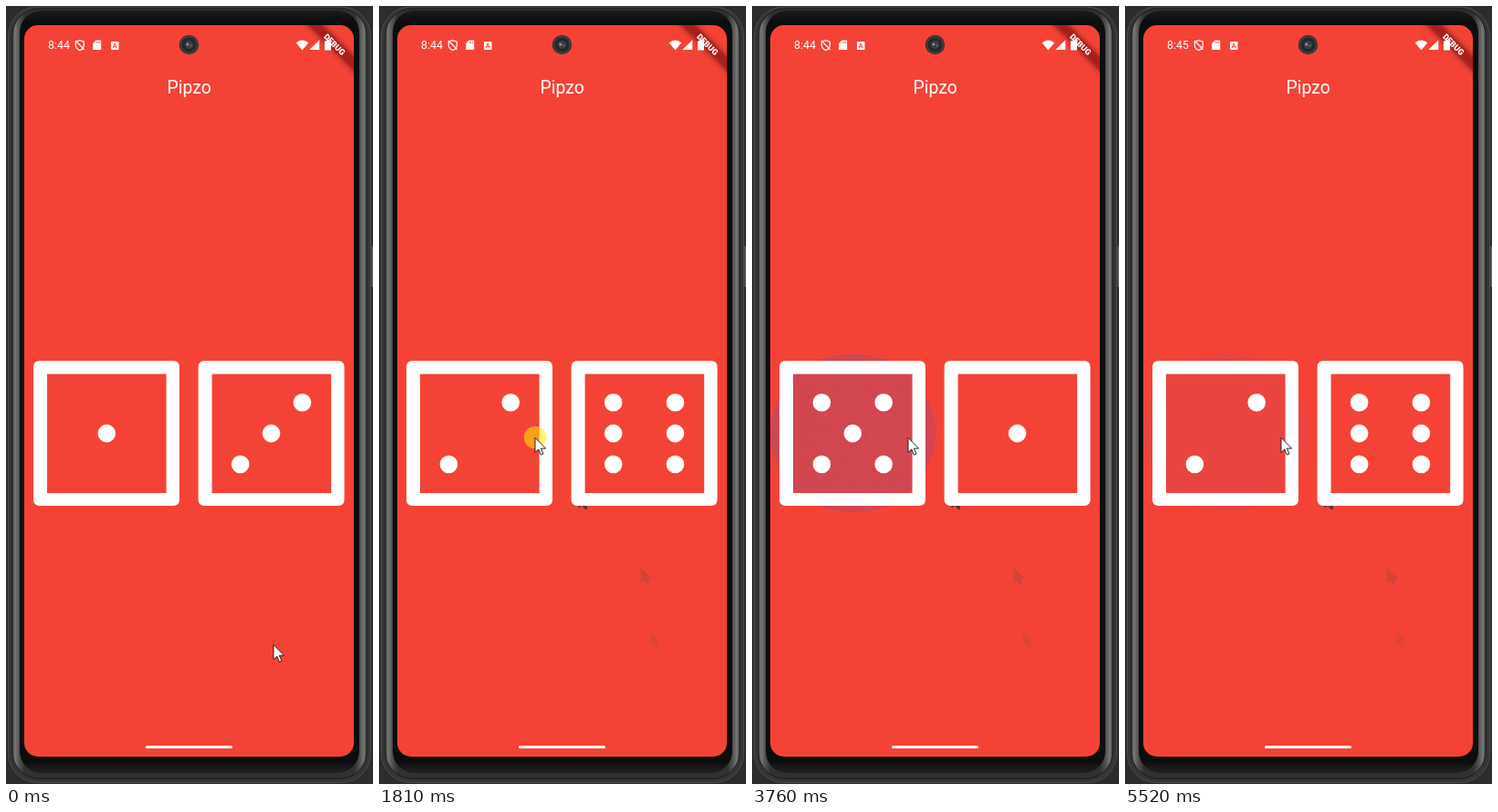
These frames come from a looping animation (402 by 853 pixels, 5650 ms). An HTML page:

```html
<!DOCTYPE html>
<html lang="en">
<head>
<meta charset="utf-8">
<title>Dice app</title>
<style>
  html, body { margin: 0; width: 100%; height: 100%; overflow: hidden; background: #292a2b; }
  svg { display: block; width: 100vw; height: 100vh; }
  text { font-family: Roboto, sans-serif; fill: #fff; }
</style>
</head>
<body>
<svg viewBox="0 0 402 853">
  <defs>
    <linearGradient id="rim">
      <stop offset="0" stop-color="#4a4b4b"/>
      <stop offset=".008" stop-color="#777"/>
      <stop offset=".018" stop-color="#555"/>
      <stop offset=".035" stop-color="#303131"/>
      <stop offset=".965" stop-color="#303131"/>
      <stop offset=".982" stop-color="#555"/>
      <stop offset=".992" stop-color="#777"/>
      <stop offset="1" stop-color="#4a4b4b"/>
    </linearGradient>
    <linearGradient id="bezel" x2="0" y2="1">
      <stop offset="0" stop-color="#1a1b1b"/>
      <stop offset=".015" stop-color="#0c0d0d"/>
      <stop offset=".985" stop-color="#0c0d0d"/>
      <stop offset="1" stop-color="#222"/>
    </linearGradient>
    <filter id="soft" x="-50%" y="-200%" width="200%" height="500%"><feGaussianBlur stdDeviation="3.4"/></filter>
    <clipPath id="screen"><rect x="20" y="21" width="361" height="802" rx="15"/></clipPath>
    <path id="arrow" d="M0 .3V16.5L3.8 13L6.4 19.1L9 18L6.4 12.1H11.6Z"/>
    <path id="frame" fill="#fff" fill-rule="evenodd" d="M37 389H183Q190 389 190 396V541Q190 548 183 548H37Q30 548 30 541V396Q30 389 37 389ZM45 403.5V534H175.6V403.5Z"/>
  </defs>

  <!-- device -->
  <rect width="402" height="853" fill="#2b2c2d"/>
  <rect x="2.5" y="1" width="397" height="850.5" rx="32" fill="#343536" stroke="#4a4b4c"/>
  <rect x="7" y="3" width="388" height="844" rx="29" fill="url(#rim)" stroke="#1a1b1b"/>
  <rect x="15" y="5" width="372" height="836" rx="24" fill="url(#bezel)"/>
  <path d="M401.3 263V308" stroke="#666" stroke-width="1.4"/>

  <g clip-path="url(#screen)">
    <rect x="20" y="21" width="361" height="802" fill="#f44336"/>
    <text x="200.6" y="96" font-size="19.4" text-anchor="middle">Pipzo</text>
    <!-- corner banner -->
    <g transform="translate(381 21) rotate(45)">
      <rect x="-70" y="24.6" width="140" height="10.5" opacity=".5" filter="url(#soft)"/>
      <rect x="-70" y="24.6" width="140" height="10.5" fill="#b71c1c" opacity=".627"/>
      <text y="33.1" font-size="9" font-weight="900" text-anchor="middle">DEBUG</text>
    </g>
    <!-- status bar -->
    <text id="clock" x="46" y="47.3" font-size="12.4"></text>
    <path d="M76.3 39.2L80.8 37.6L85.3 39.2V42.7C85.3 45.6 83.2 47.6 80.8 48.6C78.4 47.6 76.3 45.6 76.3 42.7ZM76 38L85.5 47.5" fill="none" stroke="#fff" stroke-width="1.2"/>
    <path d="M98.6 37.5H103.2Q104.2 37.5 104.2 38.5V48H95.2V41Z" fill="#fff"/>
    <path d="M99.3 39V41M101 39V41M102.6 39V41" stroke="#f44336" stroke-width=".7"/>
    <rect x="115" y="39" width="8.5" height="9" rx=".8" fill="#fff"/>
    <path d="M117 46.3L119.2 41L121.4 46.3M117.8 44.6H120.6" fill="none" stroke="#f44336"/>
    <path d="M317.7 40.2Q324.5 34.6 331.3 40.2L324.5 48.4ZM343.3 37.2V48.1H332.4ZM351 38.3V37H354V38.3H356V48.6H349V38.3Z" fill="#fff"/>
    <circle cx="200.5" cy="42.5" r="10.6" fill="#262728"/>
    <circle cx="200.5" cy="42.5" r="9" fill="none" stroke="#3e3f40" stroke-width="2"/>
    <circle cx="200.5" cy="42.5" r="4.6" fill="#3c3d3f"/>
    <circle cx="198.8" cy="42" r="1.5" fill="#899"/>
    <circle cx="202.5" cy="43.5" r="1" fill="#677"/>
    <rect x="153" y="811" width="95" height="3" rx="1.5" fill="#fff"/>

    <rect id="ripple" x="20" y="382" width="181" height="173" rx="86.5" fill="#6750a4"/>
    <path id="sparkle" stroke="#b07f9c"/>
    <use href="#frame"/>
    <use href="#frame" x="180.6"/>
    <path id="pips" fill="#fff"/>
    <g id="trail"></g>
    <circle id="press" cx="171" cy="473" r="12.3" fill="#ffeb00" opacity=".55"/>
    <use id="cursor" href="#arrow" fill="#fff" stroke="#111" stroke-width=".9"/>
  </g>
</svg>
<script>
const LOOP = 5650;
const TAP = [171, 473], CENTRE = [110.3, 468.6];
const $ = id => document.getElementById(id);
const set = (id, attrs) => { for (const k in attrs) $(id).setAttribute(k, attrs[k]); };
const clamp = v => Math.max(0, Math.min(1, v));
const mix = (a, b, p) => a + (b - a) * p;
const show = (el, on) => el.setAttribute('visibility', on ? 'visible' : 'hidden');

// time, x, y
const path = [[320, 293, 700], [390, 297, 685], [530, 287, 616], [670, 265, 585],
              [800, 215, 534], [870, 199, 492], [940, 171, 473]];
// time, left die, right die
const rolls = [[0, 1, 3], [1400, 2, 6], [1930, 1, 1], [2830, 2, 4], [3560, 5, 1], [4800, 4, 3], [5250, 2, 6]];
// start, fully grown, fade start, end, opacity
const ripples = [[1410, 1640, 1640, 1800, .2], [2560, 3260, 3300, 3480, .16],
                 [3500, 3880, 4540, 4720, .24], [4760, 5060, 5320, 5650, .2]];
const presses = [1180, 1775, 2380, 3370, 4580, 5080];
const faces = ['', '4', '26', '246', '0268', '02468', '023568'];

let seed = 7;
const rand = () => (seed = seed * 16807 % 2147483647) / 2147483647;
const dots = Array.from({ length: 360 }, () => [rand() * 2 * Math.PI, rand()]);

// faint marks the pointer leaves behind
const marks = [[390, 297, 685, .16], [530, 287, 616, .3], [670, 265, 585, .03]];
$('trail').innerHTML = marks.map(([, x, y, o]) =>
  `<use href="#arrow" x="${x}" y="${y}" fill="#844" stroke="#844" opacity="${o}"/>`).join('') +
  '<path d="M218 548H222L219 550.5ZM222.5 548H228V552H225.5L224 550Z" fill="#5e3532"/>';
const markTimes = [...marks.map(m => m[0]), 800];

function pointer(t) {
  const i = path.findIndex(p => p[0] > t);
  if (i < 0) return TAP;
  if (!i) return path[0].slice(1);
  const [a, b] = [path[i - 1], path[i]], p = (t - a[0]) / (b[0] - a[0]);
  return [mix(a[1], b[1], p), mix(a[2], b[2], p)];
}

const die = (value, cx) => [...faces[value]].map(n =>
  `M${cx + (n % 3 - 1) * 33.9 - 9.8} ${CENTRE[1] + (Math.floor(n / 3) - 1) * 33.9}` +
  'a9.8 9.8 0 1 0 19.6 0a9.8 9.8 0 1 0 -19.6 0').join('');

// an even tint over the button, with sparkles spreading from the tap
function drawRipple(t) {
  const r = ripples.find(r => t >= r[0] && t < r[3]);
  show($('ripple'), r);
  show($('sparkle'), r);
  if (!r) return;
  const [start, full, fade, end, alpha] = r;
  const p = clamp((t - start) / (full - start));
  set('ripple', { opacity: alpha * clamp(p * 1.5) * (1 - clamp((t - fade) / (end - fade))) });
  const cx = mix(TAP[0], CENTRE[0], p), cy = mix(TAP[1], CENTRE[1], p);
  const spread = Math.min(10 + 140 * p, 75);
  set('sparkle', {
    opacity: .5 * (1 - p),
    d: dots.map(([a, d]) => `M${Math.round(cx + Math.cos(a) * d * spread)} ` +
      `${Math.round(cy + Math.sin(a) * d * spread) + .5}h1`).join('')
  });
}

function draw() {
  const t = performance.now() % LOOP;
  const [, left, right] = rolls.filter(r => r[0] <= t).pop();
  set('pips', { d: die(left, CENTRE[0]) + die(right, 290.6) });
  drawRipple(t);
  const [x, y] = pointer(t);
  set('cursor', { x, y });
  show($('press'), presses.some(s => t >= s && t < s + 120));
  [...$('trail').children].forEach((mark, i) => show(mark, t > markTimes[i]));
  $('clock').textContent = t < 4700 ? '8:44' : '8:45';
  requestAnimationFrame(draw);
}
draw();
</script>
</body>
</html>
```
